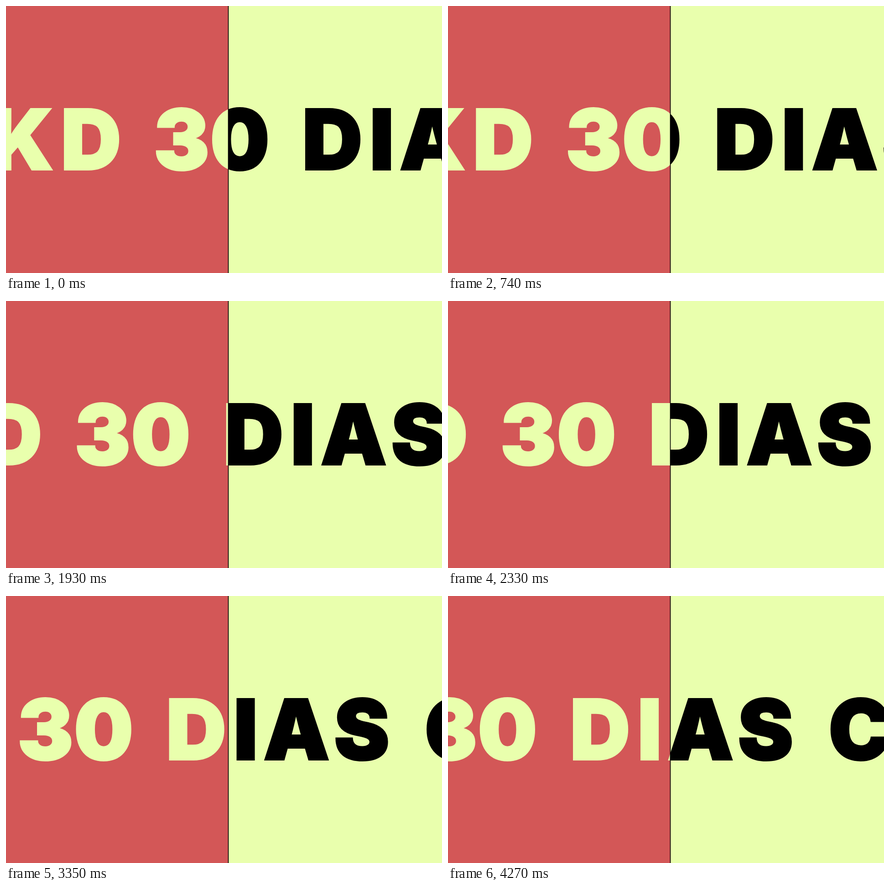
Animation, 956 px wide and 586 px high, one loop 4340 ms. Source, as an HTML page with a canvas:

```html
<!DOCTYPE html>
<html lang="pt">
<head>
<meta charset="utf-8">
<title>30 dias</title>
<style>
html, body { margin: 0; width: 100%; height: 100%; overflow: hidden; background: #e9ffad; }
canvas { display: block; }
</style>
</head>
<body>
<canvas id="stage" width="956" height="586"></canvas>
<script>
const W = 956, H = 586, SPLIT = 487, BASELINE = 359;
const RED = '#d35757', LIME = '#e9ffad', BLACK = '#000';
const LOOP = 4340, STEP_MS = 66.7, LAST_STEP = 64, STEP_PX = 5.97;

const ctx = document.getElementById('stage').getContext('2d');
ctx.font = '900 182.5px Inter, Roboto, "Liberation Sans", sans-serif';
ctx.lineWidth = 4;
ctx.miterLimit = 4;

// Each letter is centred by its ink on the given x.
const centres = [36.7, 187.5, 385, 512.7, 716.5, 824, 935.5, 1078.7, 1285];
const letters = [...'KD30DIASC'].map((char, i) => {
  const box = ctx.measureText(char);
  const inkCentre = (box.actualBoundingBoxRight - box.actualBoundingBoxLeft) / 2;
  return { char, x: centres[i] - inkCentre };
});

function drawHalf(left, width, back, ink, shift) {
  ctx.save();
  ctx.beginPath();
  ctx.rect(left, 0, width, H);
  ctx.clip();
  ctx.fillStyle = back;
  ctx.fillRect(left, 0, width, H);
  ctx.fillStyle = ctx.strokeStyle = ink;
  for (const { char, x } of letters) {
    ctx.fillText(char, x - shift, BASELINE);
    ctx.strokeText(char, x - shift, BASELINE);
  }
  ctx.restore();
}

function draw(now) {
  const step = Math.min(LAST_STEP, Math.floor((now % LOOP + 12) / STEP_MS));
  const shift = step * STEP_PX;
  drawHalf(0, SPLIT, RED, LIME, shift);
  drawHalf(SPLIT, W - SPLIT, LIME, BLACK, shift);
  ctx.fillStyle = BLACK;
  ctx.fillRect(SPLIT - 0.3, 0, 1.6, H);
}

const start = performance.now();
function tick() {
  draw(performance.now() - start);
  requestAnimationFrame(tick);
}
tick();
</script>
</body>
</html>
```
